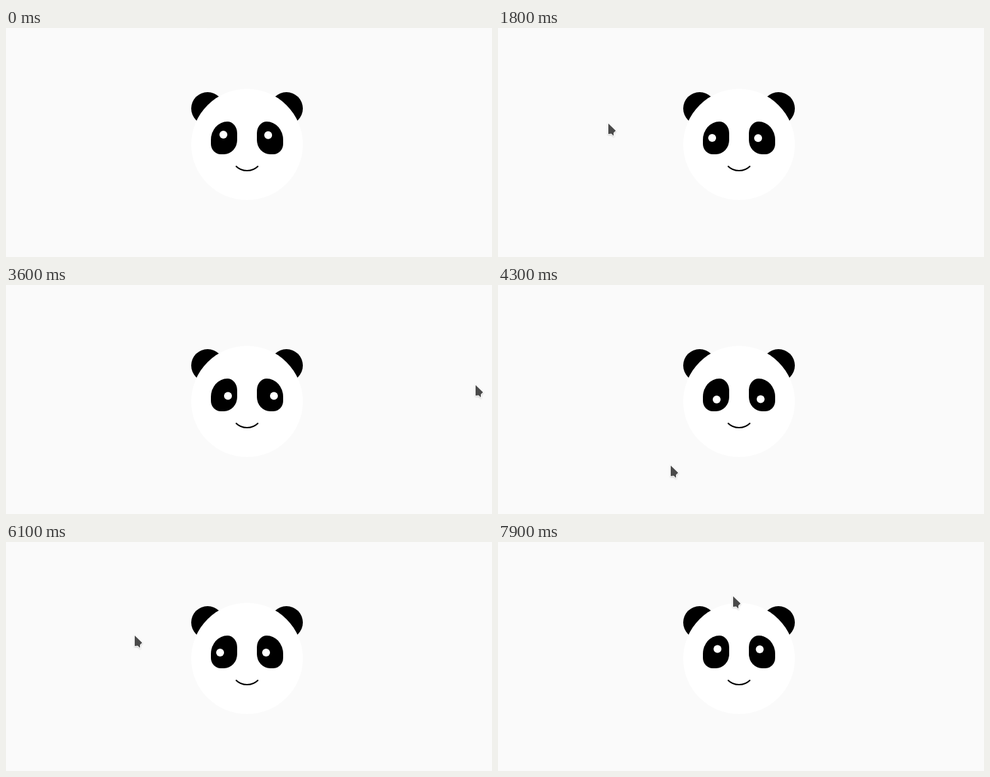
Animation of 740x350 px, one loop 8 s. Source, as an HTML page:

```html
<!DOCTYPE html>
<html lang="en">
<head>
<meta charset="utf-8">
<title>Panda</title>
<style>
  html, body { margin: 0; width: 100%; height: 100%; overflow: hidden; background: #fafafa; }
  .stage { position: relative; width: 740px; height: 350px; overflow: hidden; }
  .shade {
    position: absolute; left: 312px; top: 143px; width: 40px; height: 50px; background: #000;
    border-radius: 25px 15px 20px 15px / 28px 18px 22px 16px;
  }
  .mirrored { left: 382px; transform: scaleX(-1); }
  svg { position: absolute; left: 0; top: 0; }
  #cursor { filter: drop-shadow(0 1px 1px rgba(0, 0, 0, .2)); }
</style>
</head>
<body>
<div class="stage">
  <svg width="740" height="350">
    <circle cx="307" cy="123" r="25"/>
    <circle cx="427" cy="123" r="25"/>
    <circle cx="367" cy="178" r="85" fill="#fff"/>
    <path d="M350 211A24 24 0 0 0 384 211" fill="none" stroke="#000" stroke-width="2"/>
  </svg>
  <div class="shade"></div>
  <div class="shade mirrored"></div>
  <svg width="740" height="350">
    <circle class="pupil" r="6" fill="#fff"/>
    <circle class="pupil" r="6" fill="#fff"/>
    <path id="cursor" d="M0 0L11.3 11L8 14V18.8L4.5 15.6L0 16Z" fill="#4a4a4a"
          stroke="#fff" stroke-width="1.6" paint-order="stroke"/>
  </svg>
</div>
<script>
const LOOP = 8000, STEP = 100, REACH = 6;
const eyes = [{ x: 332, y: 169 }, { x: 402, y: 169 }];
const pupils = document.querySelectorAll('.pupil');
const cursor = document.getElementById('cursor');

// Each sweep bends from the previous end point to `to`; without a bend it eases out straight.
const home = [300, -22];
const sweeps = [
  { start: 700, end: 1600, bend: [10, 85], to: [147, 131] },
  { start: 1600, end: 2400, bend: [193, 164], to: [207, 175] },
  { start: 2700, end: 3600, bend: [440, 359], to: [715, 153] },
  { start: 3800, end: 4500, bend: [398, 449], to: [82, 157] },
  { start: 4700, end: 5200, bend: [487, 162], to: [523, 150] },
  { start: 5200, end: 5600, to: [68, 164] },
  { start: 6000, end: 6100, to: [196, 143] },
  { start: 6100, end: 6800, bend: [360, 106], to: [341, 141] },
  { start: 6800, end: 7400, to: [355, 174] },
  { start: 7700, end: 7900, to: [358, 83] }
];

const bezier = (a, b, c, k) => (1 - k) ** 2 * a + 2 * k * (1 - k) * b + k * k * c;

function pointerAt(t) {
  let point = home;
  for (const { start, end, to, bend = to } of sweeps) {
    if (t <= start) break;
    const k = Math.min(1, (t - start) / (end - start));
    point = point.map((from, axis) => bezier(from, bend[axis], to[axis], k));
  }
  return point;
}

function draw(now) {
  const t = Math.floor(now % LOOP / STEP) * STEP;
  const [x, y] = pointerAt(t).map(Math.round);
  cursor.setAttribute('transform', `translate(${x} ${y})`);

  // The eyes trail the pointer by one step
  const [lookX, lookY] = pointerAt(t - STEP);
  eyes.forEach((eye, i) => {
    const angle = Math.atan2(lookY - eye.y, lookX - eye.x);
    pupils[i].setAttribute('cx', eye.x + REACH * Math.cos(angle));
    pupils[i].setAttribute('cy', eye.y + REACH * Math.sin(angle));
  });
}

const start = performance.now();
function tick() {
  draw(performance.now() - start);
  requestAnimationFrame(tick);
}
tick();
</script>
</body>
</html>
```
